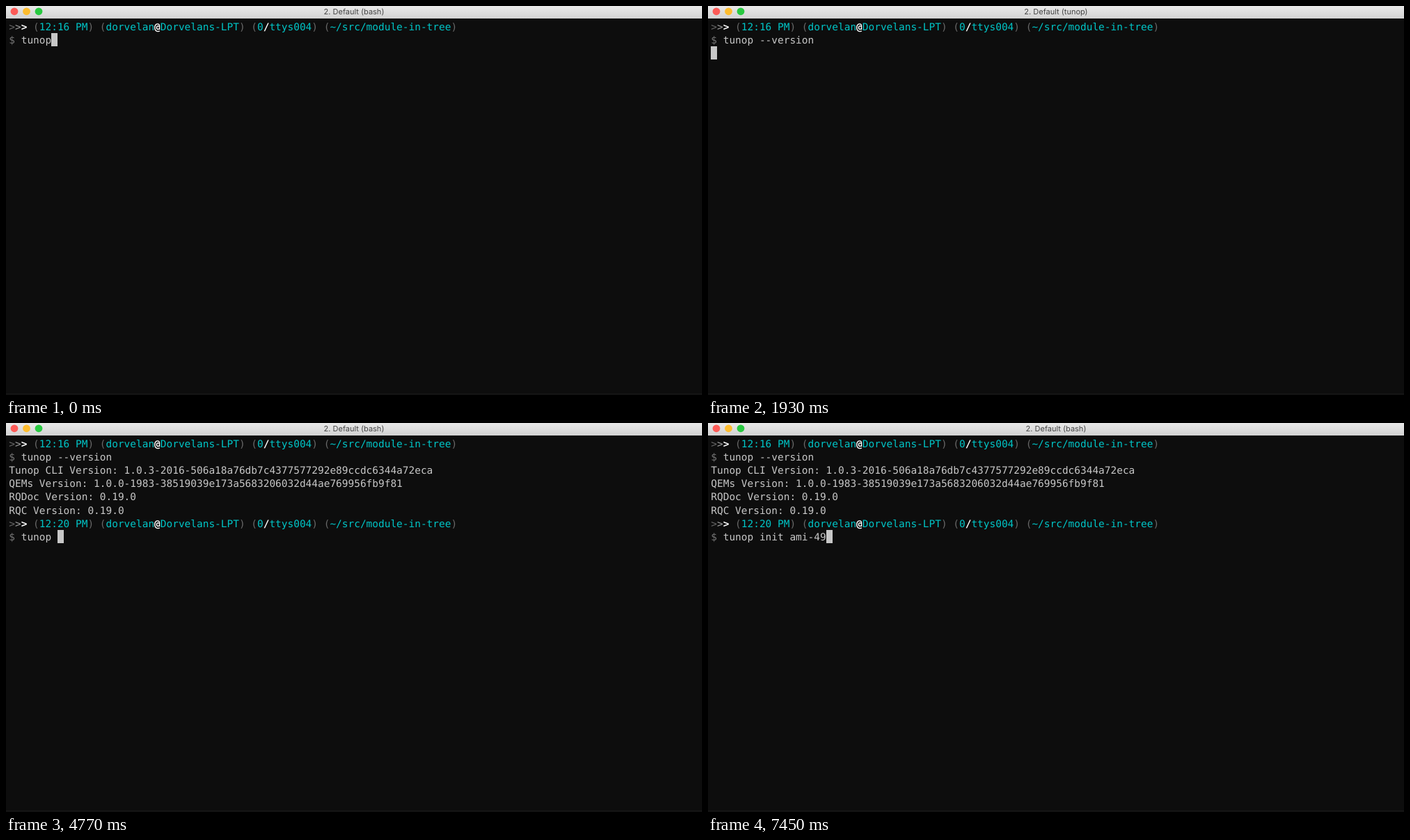
Recreate the animation shown at these times as an HTML page with a canvas. Size 1000 by 560 pixels, loop 8 s.

```html
<!DOCTYPE html>
<html lang="en">
<head>
<meta charset="utf-8">
<title>Terminal</title>
<style>
  html, body { margin: 0; width: 100%; height: 100%; overflow: hidden; background: #0d0d0d; }
  canvas { display: block; }
</style>
</head>
<body>
<canvas id="stage" width="1000" height="560"></canvas>
<script>
const ctx = document.getElementById('stage').getContext('2d');
const W = 1000, H = 560, BAR = 18, LOOP = 8000;
const LEFT = 4.3, TOP = 20.2, CELL = 8.7, ROW = 19.1, BASE = 14.8;
const MONO = '14.45px "DejaVu Sans Mono", monospace';
const TEXT = '#c7c7c7', CYAN = '#00c5c7', DIM = '#686868', WHITE = '#ffffff';

const FIRST = 'tunop --version';
const SECOND = 'tunop init ami-49';
const OUTPUT = [
  'Tunop CLI Version: 1.0.3-2016-506a18a76db7c4377577292e89ccdc6344a72eca',
  'QEMs Version: 1.0.0-1983-38519039e173a5683206032d44ae769956fb9f81',
  'RQDoc Version: 0.19.0',
  'RQC Version: 0.19.0'
];

// [time in ms, characters typed so far]
const TYPE_FIRST = [[0, 5], [300, 6], [450, 8], [600, 9], [740, 11], [890, 12], [1040, 14], [1190, 15]];
const TYPE_SECOND = [[0, 0], [4020, 2], [4170, 4], [4320, 5], [4770, 6], [4920, 8], [5070, 9], [5220, 10],
  [5810, 11], [6260, 13], [6410, 14], [6710, 15], [7300, 16], [7450, 17]];
const ENTER = 1480, PRINT = 2380, PROMPT = 2530;
const BUSY_FROM = 1930, BUSY_TO = 3430;

function typed(text, steps, t) {
  let n = 0;
  for (const [at, count] of steps) if (t >= at) n = count;
  return text.slice(0, n);
}

// Writes on the character grid and returns the next free column.
function write(text, col, row, color = TEXT, bold = false) {
  ctx.font = (bold ? 'bold ' : '') + MONO;
  ctx.fillStyle = color;
  for (const ch of text) {
    if (ch !== ' ') ctx.fillText(ch, LEFT + col * CELL, TOP + row * ROW + BASE);
    col++;
  }
  return col;
}

function cursor(col, row) {
  ctx.fillStyle = TEXT;
  ctx.fillRect(Math.round(LEFT + col * CELL), Math.round(TOP + row * ROW), 9, 19);
}

function prompt(row, clock) {
  const parts = [
    ['>', DIM], ['>', '#a0a0a0'], ['>', WHITE, true],
    [' (', DIM], [clock, CYAN], [') (', DIM],
    ['dorvelan', CYAN], ['@', WHITE, true], ['Dorvelans-LPT', CYAN], [') (', DIM],
    ['0', CYAN], ['/', WHITE, true], ['ttys004', CYAN], [') (', DIM],
    ['~/src/module-in-tree', CYAN], [')', DIM]
  ];
  let col = 0;
  for (const [text, color, bold] of parts) col = write(text, col, row, color, bold);
}

function command(row, text, active) {
  write('$', 0, row, '#777777');
  const end = write(text, 2, row);
  if (active) cursor(end, row);
}

function titleBar(job) {
  const shade = ctx.createLinearGradient(0, 0, 0, BAR);
  shade.addColorStop(0, '#e8e8e8');
  shade.addColorStop(1, '#d2d2d2');
  ctx.fillStyle = shade;
  ctx.fillRect(0, 0, W, BAR);
  ['#fc5b57', '#fdbc2e', '#28c940'].forEach((color, i) => {
    ctx.fillStyle = color;
    ctx.beginPath();
    ctx.arc(12 + i * 17.5, 7.8, 5.4, 0, Math.PI * 2);
    ctx.fill();
  });
  ctx.font = '11px Inter, sans-serif';
  ctx.fillStyle = '#444444';
  ctx.textAlign = 'center';
  ctx.fillText('2. Default (' + job + ')', W / 2, 12.3);
  ctx.textAlign = 'left';
}

function draw(t) {
  ctx.fillStyle = '#0d0d0d';
  ctx.fillRect(0, 0, W, H);
  ctx.fillStyle = '#1a1a1a';
  ctx.fillRect(0, 558, W, 1);

  titleBar(t >= BUSY_FROM && t < BUSY_TO ? 'tunop' : 'bash');
  prompt(0, '12:16 PM');
  command(1, typed(FIRST, TYPE_FIRST, t), t < ENTER);

  if (t >= PRINT) OUTPUT.forEach((line, i) => write(line, 0, 2 + i));
  if (t >= PROMPT) {
    prompt(6, '12:20 PM');
    command(7, typed(SECOND, TYPE_SECOND, t), true);
  } else if (t >= ENTER) {
    cursor(0, t >= PRINT ? 6 : 2);
  }
}

ctx.textRendering = 'geometricPrecision';
const start = performance.now();
function tick() {
  draw((performance.now() - start) % LOOP);
  requestAnimationFrame(tick);
}
tick();
</script>
</body>
</html>
```
